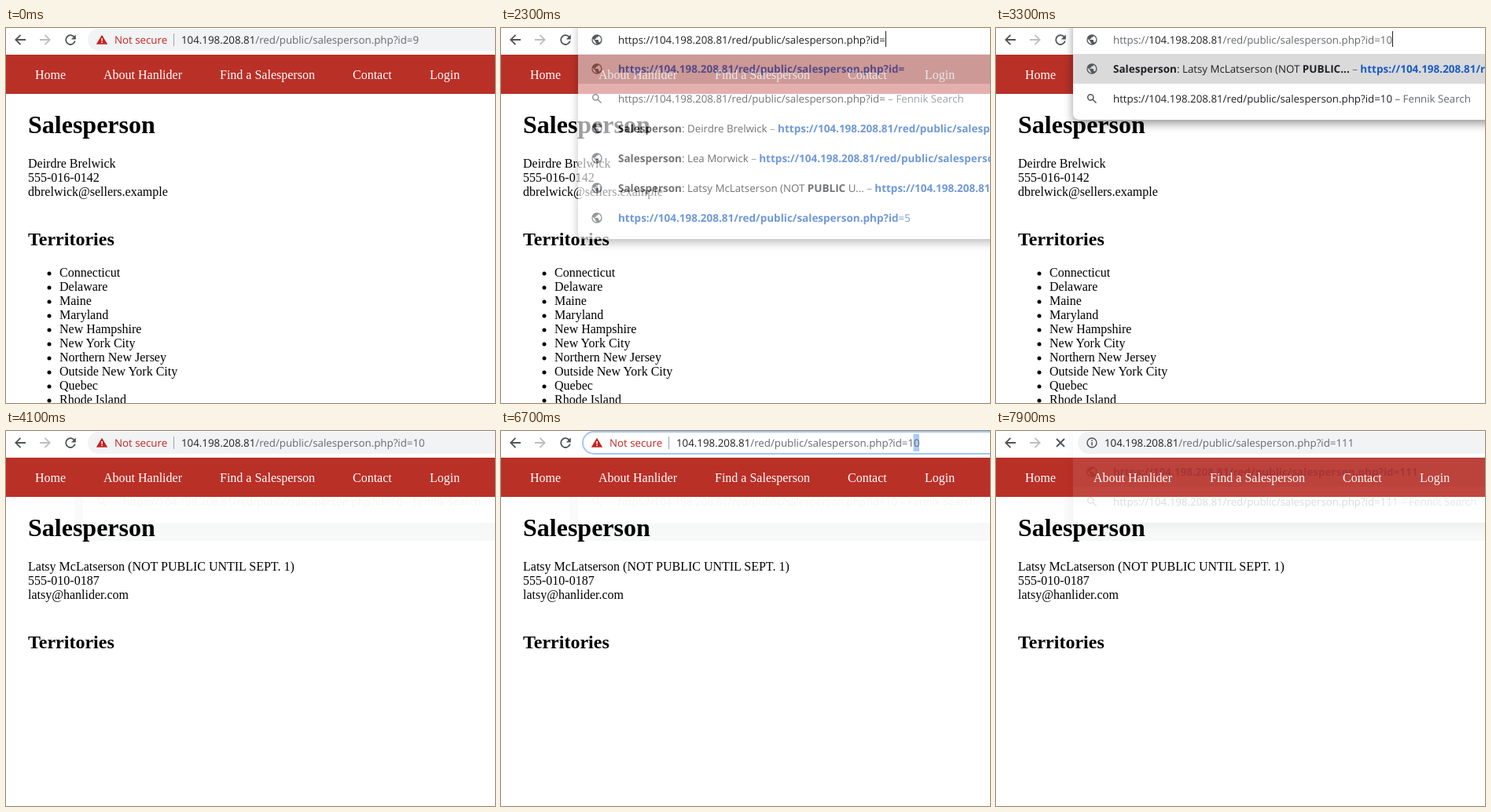
Recreate the animation shown at these times as an HTML page. Size 622x478 px, loop 8 s.

```html
<!DOCTYPE html>
<html lang="en">
<head>
<meta charset="utf-8">
<title>Salesperson</title>
<style>
  html, body { margin: 0; width: 100%; height: 100%; overflow: hidden; background: #fff; }
  svg { display: block; }
  text { white-space: pre; }
  .page { font: 16px "Liberation Serif", "Times New Roman", serif; }
  .ui { font: 13.3px "Open Sans", "Noto Sans", sans-serif; fill: #202124; text-rendering: geometricPrecision; }
  .b { font-weight: 700; font-size: 13.5px; }
  .link { fill: #1a5bc4; }
  .dim { fill: #666a6e; }
  .red { fill: #c5221f; }
  .strike { fill: #c5221f; text-decoration: line-through; }
  .line { fill: none; stroke: #505357; stroke-width: 1.8; }
  .sheet { filter: drop-shadow(0 5px 6px #0006); }
</style>
</head>
<body>
<svg id="stage" width="622" height="478" viewBox="0 0 622 478"></svg>
<script>
const LOOP = 8000;
const HOST = '104.198.208.81', PATH = '/red/public/salesperson.php?id';
const NAV = [[37, 'Home'], [124, 'About Hanlider'], [272, 'Find a Salesperson'], [441, 'Contact'], [539, 'Login']];
const PEOPLE = {
  9: ['Deirdre Brelwick', '555-016-0142', 'dbrelwick@sellers.example'],
  10: ['Latsy McLatserson (NOT PUBLIC UNTIL SEPT. 1)', '555-010-0187', 'latsy@hanlider.com']
};
const TERRITORIES = ['Connecticut', 'Delaware', 'Maine', 'Maryland', 'New Hampshire', 'New York City',
  'Northern New Jersey', 'Outside New York City', 'Quebec', 'Rhode Island'];

// bar: idle | hover | focus | type | load; popup: full | match | plain
const STATES = [
  { t: 0, page: 9, bar: 'idle', id: '9' },
  { t: 100, page: 9, bar: 'hover', id: '9' },
  { t: 700, page: 9, bar: 'focus', id: '9' },
  { t: 1300, page: 9, bar: 'focus', id: '9', scheme: true, caret: 570.5 },
  { t: 2300, page: 9, bar: 'type', id: '', popup: 'full', alpha: .62, caret: 489.5 },
  { t: 2500, page: 9, bar: 'type', id: '', popup: 'full', alpha: 1, caret: 489.5 },
  { t: 2700, page: 9, bar: 'type', id: '10', popup: 'plain', alpha: 1, caret: 504.5 },
  { t: 2900, page: 9, bar: 'type', id: '100', popup: 'plain', alpha: 1, caret: 512.5 },
  { t: 3300, page: 9, bar: 'type', id: '10', popup: 'match', alpha: 1, caret: 504.5 },
  { t: 3500, page: 9, bar: 'load', id: '10', trace: true },
  { t: 4100, page: 10, bar: 'idle', id: '10', trace: true },
  { t: 5500, page: 10, bar: 'hover', id: '10', trace: true },
  { t: 5700, page: 10, bar: 'focus', id: '10', trace: true },
  { t: 6700, page: 10, bar: 'focus', id: '10', trace: true, select: 524.5 },
  { t: 6900, page: 10, bar: 'focus', id: '10', trace: true, scheme: true, select: 570 },
  { t: 7100, page: 10, bar: 'type', id: '111', popup: 'plain', alpha: 1, caret: 512.5 },
  { t: 7900, page: 10, bar: 'load', id: '111', popup: 'plain', alpha: .11, trace: true }
];

const text = (x, y, body, attrs = '') => `<text x="${x}" y="${y}" ${attrs}>${body}</text>`;
const rect = (x, y, w, h, fill, attrs = '') =>
  `<rect x="${x}" y="${y}" width="${w}" height="${h}" fill="${fill}" ${attrs}/>`;
const span = (cls, body) => `<tspan class="${cls}">${body}</tspan>`;
const line = (d, attrs = '') => `<path class="line" d="${d}" ${attrs}/>`;
const address = id => `${HOST}${PATH}=${id}`;
const toned = id => HOST + span('dim', `${PATH}=${id}`);

const GLOBE = 'M12 2a10 10 0 1 0 0 20a10 10 0 0 0 0-20zm-1 17.9c-4-.5-7-3.8-7-7.9 0-.6.1-1.2.2-1.8L9 15v1a2 2 0 0 0 2 2z' +
  'm6.9-2.5a2 2 0 0 0-1.9-1.4h-1v-3a1 1 0 0 0-1-1H8v-2h2a1 1 0 0 0 1-1V7h2a2 2 0 0 0 2-2v-.4a8 8 0 0 1 2.9 12.8z';
const globe = y => `<path d="${GLOBE}" fill="#55585c" transform="translate(114 ${y - 8}) scale(.667)"/>`;
const lens = y => `<g class="line" style="stroke-width:1.5"><circle cx="120.3" cy="${y - 1.7}" r="3.6"/>` +
  `<path d="M123 ${y + 1}l4.5 4.5"/></g>`;

function page(s) {
  const lines = PEOPLE[s.page].map((p, i) => text(28, 178 + 18 * i, p));
  const list = s.page === 9 ? TERRITORIES.map((name, i) =>
    `<circle cx="55" cy="${313 + 18 * i}" r="2.5"/>` + text(68, 317 + 18 * i, name)) : [];
  return `<g class="page">${rect(0, 34, 622, 50, '#b93027')}
    ${NAV.map(([x, label]) => text(x, 65, label, 'fill="#fff"')).join('')}
    ${text(28, 134, 'Salesperson', 'font-size="32" font-weight="700"')}
    ${lines.join('')}
    ${text(28, 277, 'Territories', 'font-size="24" font-weight="700"')}
    ${list.join('')}</g>`;
}

function buttons(s) {
  const reload = s.bar === 'load'
    ? line('M77 10l10 10M87 10l-10 10')
    : line('M87 11.8A5.9 5.9 0 1 0 87.8 16.5') + '<path d="M88.8 8.5v6h-6z" fill="#505357"/>';
  return line('M25 15H12.5M18.5 8.8L12.3 15l6.2 6.2') +
    line('M43 15h12.5M49.5 8.8l6.2 6.2-6.2 6.2', 'style="stroke:#bcbec0"') + reload;
}

function rows(s) {
  const search = 'https://' + address(s.id) + span('dim', ' – Fennik Search');
  const link = span('b link', 'https://' + address(s.id));
  const person = (name, id) => span('b', 'Salesperson') + ': ' + name + span('dim', ' – ') +
    span('b link', 'https://' + HOST + PATH) + span('link', '=' + id);
  const latsy = end => 'Latsy McLatserson (NOT ' + span('b', 'PUBLIC') + end;
  if (s.popup === 'match') return [[globe, person(latsy(span('b', '...')), 10)], [lens, search]];
  const top = [[globe, link], [lens, search]];
  if (s.popup === 'plain') return top;
  return top.concat([
    [globe, person('Deirdre Brelwick', 9)],
    [globe, person('Lea Morwick', 3)],
    [globe, person(latsy(' U...'), 10)],
    [globe, span('b link', 'https://' + HOST + PATH) + span('link', '=5')]
  ]);
}

function popup(s) {
  if (!s.popup) return '';
  const items = rows(s);
  const body = items.map(([icon, label], i) => icon(52 + 38 * i) + text(149, 57 + 38 * i, label));
  return `<g class="ui" opacity="${s.alpha}">
    ${rect(98, -12, 560, 53 + 38 * items.length, '#fff', 'rx="8" class="sheet"')}
    ${rect(98, 33, 524, 38, '#dadada')}${body.join('')}</g>`;
}

// Faint remainder of the closed popup
function trace(s) {
  if (!s.trace) return '';
  return rect(98, 117, 524, 23, '#f7f9f9') + rect(87, 84, 11, 33, '#fafafa') +
    `<g class="ui" opacity=".045">${lens(90)}${text(149, 95, 'https://' + address('10') + ' – Fennik Search')}</g>`;
}

function bar(s) {
  const fill = { idle: '#f1f3f4', hover: '#e8eaed', load: '#f1f3f4' }[s.bar] || '#fff';
  const ring = s.bar === 'focus' ? 'stroke="#a3c7f6" stroke-width="2"' : '';
  let out = rect(104, 1, 560, 28, fill, `rx="14" ${ring}`);
  if (s.select) out += rect(s.select, 4, 7.5, 22, '#a8ccf8');
  if (s.bar === 'type') {
    const label = s.popup === 'match' ? span('dim', 'https://') + toned(s.id) : 'https://' + address(s.id);
    out += globe(15) + text(149, 20, label);
  } else if (s.bar === 'load') {
    out += '<circle class="line" cx="122" cy="15" r="6" style="stroke-width:1.4"/>' +
      rect(121.3, 14, 1.5, 4.5, '#505357') + rect(121.3, 11.3, 1.5, 1.6, '#505357') + text(138, 20, toned(s.id));
  } else {
    const scheme = s.scheme ? span('strike', 'https') + span('dim', '://') : '';
    out += '<path class="red" d="M122 8.7l7.2 12.1h-14.4z"/>' +
      rect(121.3, 13, 1.5, 3.6, '#fff') + rect(121.3, 17.6, 1.5, 1.5, '#fff') +
      text(138, 20, 'Not secure', 'class="red"') + rect(213, 7, 1, 16, '#a0a4a8') +
      text(223, 20, scheme + toned(s.id));
  }
  if (s.caret) out += rect(s.caret - .5, 4, 1, 20, '#202124');
  return `<g class="ui">${out}</g>`;
}

const stage = document.getElementById('stage');
let shown;
function draw(now) {
  const t = now % LOOP;
  const s = STATES.findLast(state => state.t <= t) || STATES[0];
  if (s !== shown) {
    shown = s;
    stage.innerHTML = trace(s) + page(s) + buttons(s) + popup(s) + bar(s);
  }
}
const start = performance.now();
function tick() {
  draw(performance.now() - start);
  requestAnimationFrame(tick);
}
tick();
</script>
</body>
</html>
```
